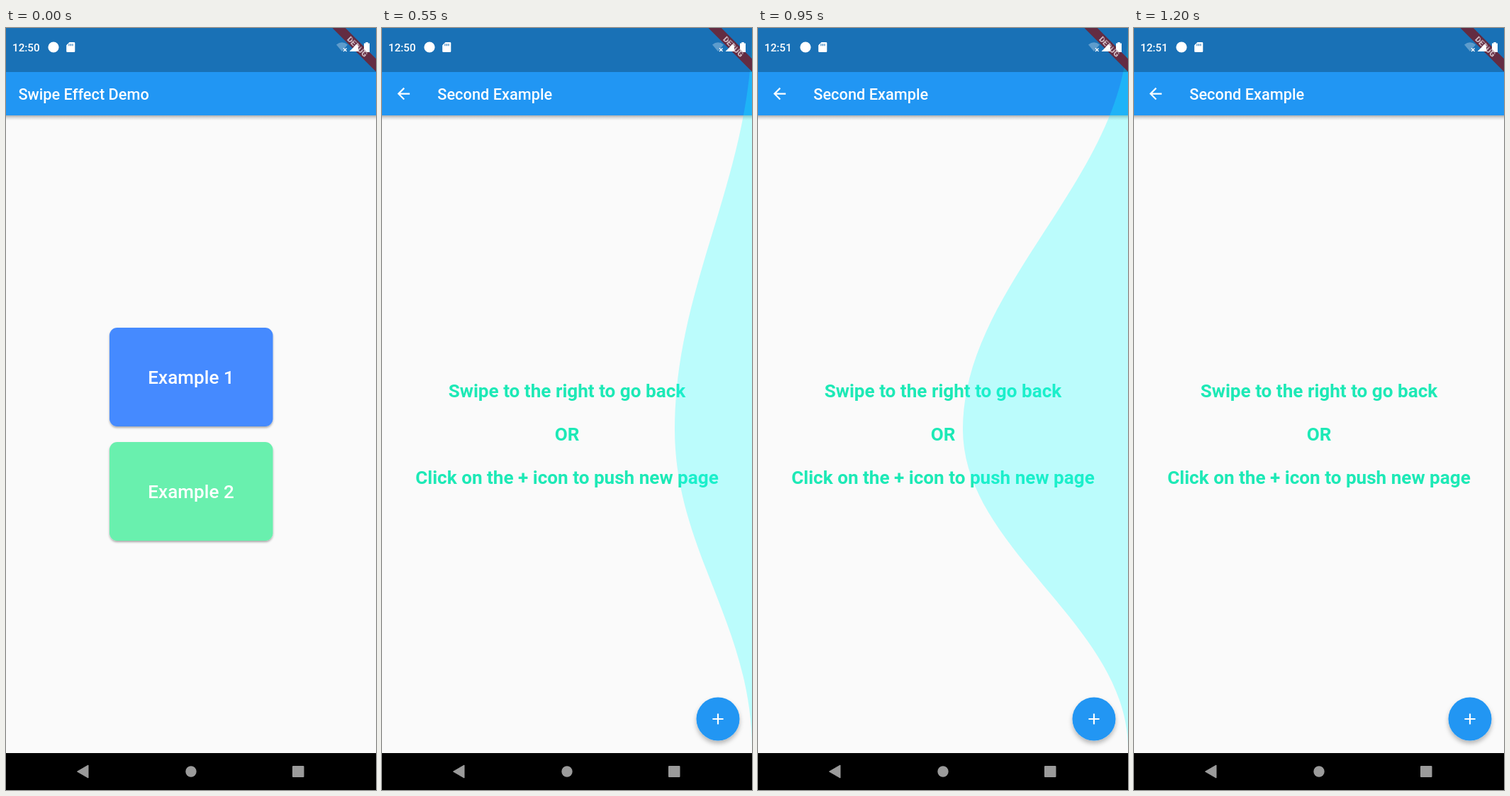
Write an HTML page that moves like this. It is 522 by 1073 pixels and loops after 1.4 s.

```html
<!DOCTYPE html>
<html lang="en">
<head>
<meta charset="utf-8">
<title>Swipe Effect Demo</title>
<style>
  html, body { margin: 0; width: 100%; height: 100%; overflow: hidden; background: #fafafa; }
  svg { display: block; width: 100%; height: 100%; }
  text { font-family: Roboto, "Noto Sans", sans-serif; font-weight: 500; fill: #fff; }
  .title { font-size: 21.75px; }
  .label { font-size: 26.1px; text-anchor: middle; }
  .hint { font-weight: 700; fill: #1de9b6; }
  .clock { font-size: 15.2px; }
  .debug { font-size: 11.1px; font-weight: 900; text-anchor: middle; fill: #d0bac2; }
</style>
</head>
<body>
<svg viewBox="0 0 522 1073">
  <defs>
    <linearGradient id="fade" x1="0" y1="0" x2="0" y2="1">
      <stop offset="0" stop-color="#000" stop-opacity=".3"/>
      <stop offset=".5" stop-color="#000" stop-opacity=".11"/>
      <stop offset="1" stop-color="#000" stop-opacity="0"/>
    </linearGradient>
    <filter id="cardShadow" x="-10%" y="-10%" width="120%" height="125%">
      <feDropShadow dx="0" dy="2" stdDeviation="1.4" flood-opacity=".32"/>
    </filter>
    <filter id="fabShadow" x="-30%" y="-30%" width="160%" height="170%">
      <feDropShadow dx="0" dy="4" stdDeviation="3" flood-opacity=".28"/>
    </filter>
  </defs>

  <rect width="522" height="1073" fill="#fafafa"/>
  <rect y="123" width="522" height="7" fill="url(#fade)"/>
  <rect width="522" height="123" fill="#2196f3"/>

  <g id="home">
    <text class="title" x="17.4" y="101">Swipe Effect Demo</text>
    <g filter="url(#cardShadow)">
      <rect x="146" y="422" width="230.5" height="139" rx="10.9" fill="#448aff"/>
      <rect x="146" y="583" width="230.5" height="139" rx="10.9" fill="#69f0ae"/>
    </g>
    <text class="label" x="261" y="500.5">Example 1</text>
    <text class="label" x="261" y="661.5">Example 2</text>
  </g>

  <g id="detail">
    <path transform="translate(17.4 79.5) scale(1.0875)" fill="#fff"
      d="M20 11H7.83l5.59-5.59L12 4l-8 8 8 8 1.41-1.41L7.83 13H20z"/>
    <text class="title" x="78.3" y="101">Second Example</text>
    <text class="label hint" x="261" y="520">Swipe to the right to go back</text>
    <text class="label hint" x="261" y="581">OR</text>
    <text class="label hint" x="261" y="642">Click on the + icon to push new page</text>
    <circle cx="474" cy="973" r="30.5" fill="#2196f3" filter="url(#fabShadow)"/>
    <path d="M466.4 973h15.2M474 965.4v15.2" stroke="#fff" stroke-width="2.2"/>
    <path id="wave" fill="#18ffff" fill-opacity=".28"/>
  </g>

  <!-- status bar -->
  <rect width="522" height="62" fill="#000" fill-opacity=".25"/>
  <g transform="translate(522 0) rotate(45)">
    <rect x="-44" y="30.5" width="88" height="13" fill="#632c42"/>
    <text class="debug" x="0" y="41">DEBUG</text>
  </g>
  <text id="clock" class="clock" x="9" y="32.5"></text>
  <g fill="#fff">
    <circle cx="67" cy="27" r="7.6"/>
    <path d="M89.5 20H96a1.3 1.3 0 0 1 1.3 1.3V32.7A1.3 1.3 0 0 1 96 34H86.500a1.300 1.300 0 0 1-1.300-1.300V24.300z"/>
    <path d="M466 23.500Q474 17 482 23.500L474 33z" opacity=".3"/>
    <path d="M497 20.500V33H484.500z"/>
    <path d="M507.300 20h3.400v1.500h2.300V34h-8V21.500h2.300z"/>
  </g>
  <path d="M89 22.200v3M91.500 22.200v3M94 22.200v3" stroke="#1970b6" stroke-width="1.100"/>
  <path d="M476 28.500l4.500 4.500m0-4.500l-4.500 4.500" stroke="#fff" stroke-width="1.300"/>
  <path d="M487 13.500L513.500 40" stroke="#632c42" stroke-width="3" opacity=".35"/>

  <!-- navigation bar -->
  <rect y="1021" width="522" height="52" fill="#000"/>
  <g fill="#9b9b9b">
    <path d="M100.500 1047L116 1038V1056z" stroke="#9b9b9b" stroke-linejoin="round"/>
    <circle cx="261" cy="1047" r="7.700"/>
    <rect x="404" y="1039" width="16.500" height="16" rx="1"/>
  </g>
</svg>
<script>
  const LOOP = 1400, STEP = 50;
  const OPEN = 200, MINUTE = 650, RELEASE = 1200;
  const EDGE = 522, PEAK_Y = 565;
  // finger travel: [ms, px from the right edge]
  const DRAG = [[200, 0], [350, 48], [550, 109], [750, 193], [950, 233], [1150, 314]];
  const el = id => document.getElementById(id);
  const home = el("home"), detail = el("detail"), wave = el("wave"), clock = el("clock");

  function dragDepth(t) {
    if (t < OPEN || t >= RELEASE) return 0;
    for (let i = 1; i < DRAG.length; i++) {
      const [t0, d0] = DRAG[i - 1], [t1, d1] = DRAG[i];
      if (t <= t1) return d0 + (d1 - d0) * (t - t0) / (t1 - t0);
    }
    return DRAG[DRAG.length - 1][1];
  }

  function wavePath(depth) {
    const x = EDGE - depth;
    return `M${EDGE} 0C${EDGE} 208 ${x} 362 ${x} ${PEAK_Y}` +
           `C${x} 735 ${EDGE} 840 ${EDGE} 1015Z`;
  }

  function draw(time) {
    const t = Math.floor(time % LOOP / STEP) * STEP;
    const opened = t >= OPEN;
    home.style.display = opened ? "none" : "";
    detail.style.display = opened ? "" : "none";
    clock.textContent = t < MINUTE ? "12:50" : "12:51";
    wave.setAttribute("d", wavePath(dragDepth(t)));
  }

  const start = performance.now();
  function tick() {
    draw(performance.now() - start);
    requestAnimationFrame(tick);
  }
  tick();
</script>
</body>
</html>
```
